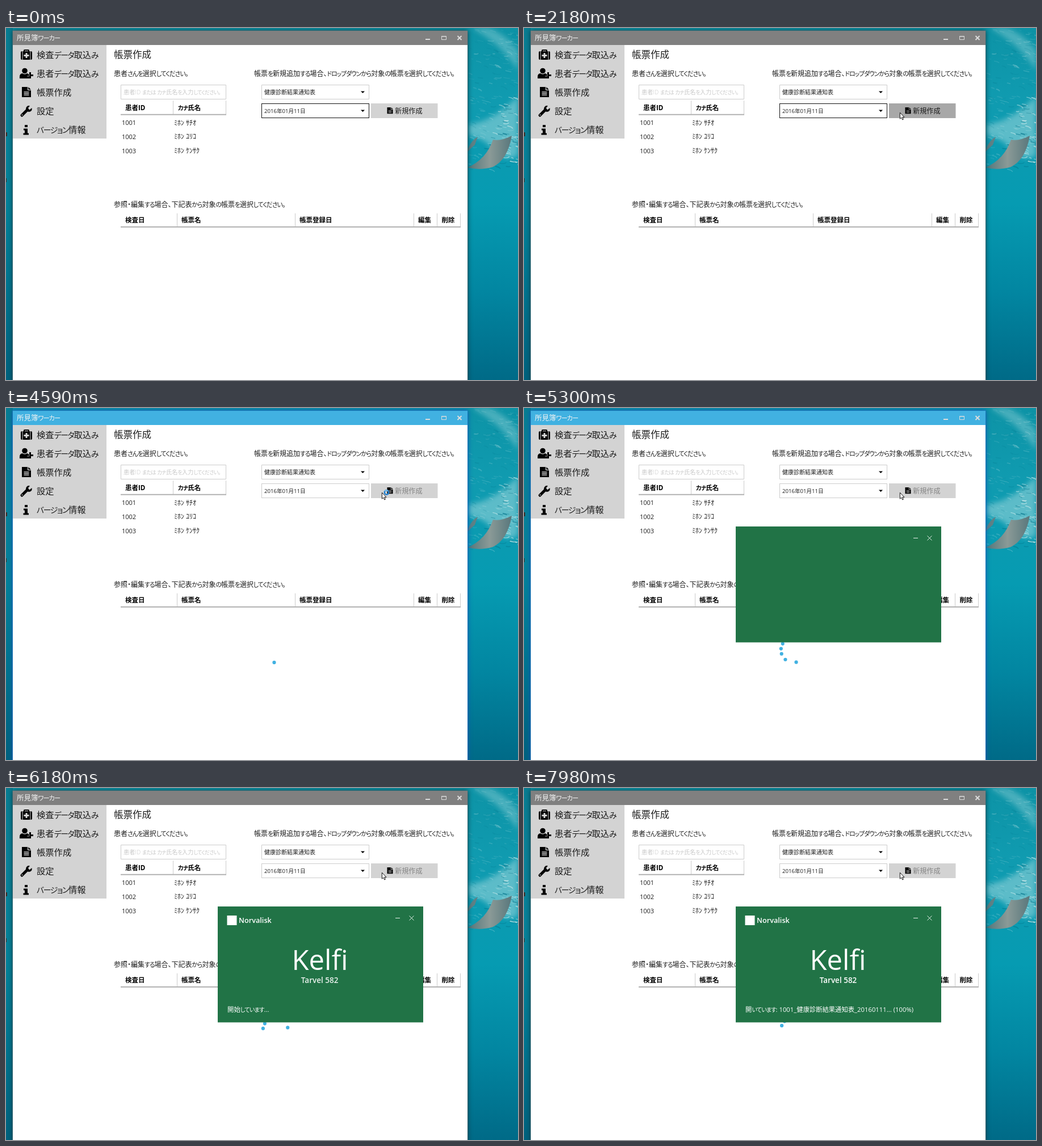
Recreate the animation shown at these times as an HTML page. Size 902 px wide and 621 px high, loop 8 s.

```html
<!DOCTYPE html>
<html lang="ja">
<head>
<meta charset="utf-8">
<style>
html, body { margin: 0; width: 100%; height: 100%; overflow: hidden; }
svg { display: block; width: 902px; height: 621px; }
text { font-family: "Open Sans", "Noto Sans CJK JP", "Noto Sans CJK", sans-serif; font-feature-settings: "palt"; white-space: pre; }
.kana { font-size: .9em; letter-spacing: -.09em; }
#frame { filter: drop-shadow(0 0 4px var(--glow)); }
.soft { filter: blur(5px); }
</style>
</head>
<body>
<svg viewBox="0 0 902 621">
  <defs>
    <linearGradient id="sea" x2="0" y2="1">
      <stop stop-color="#0d93a6"/><stop offset=".2" stop-color="#109bb0"/>
      <stop offset=".5" stop-color="#069bb2"/><stop offset=".75" stop-color="#0286a1"/>
      <stop offset="1" stop-color="#006a87"/>
    </linearGradient>
    <linearGradient id="wing" x2="1">
      <stop stop-color="#50757a"/><stop offset=".5" stop-color="#8b9a97"/><stop offset="1" stop-color="#58777c"/>
    </linearGradient>
    <path id="doc" d="M0 0H10V6H16V18H0ZM11.3 0 16 4.7H11.3ZM3.5 8.3V9.7H12.5V8.3ZM3.5 11V12.4H12.5V11ZM3.5 13.7V15.1H12.5V13.7Z" fill-rule="evenodd"/>
  </defs>

  <rect width="902" height="621" fill="url(#sea)"/>
  <rect width="12" height="621" fill="#00506a" opacity=".35"/>
  <g class="soft" fill="#d5eeee">
    <path d="M814 170Q860 165 902 120V225Q880 240 850 205Q830 190 814 190Z" opacity=".4"/>
    <path d="M820 0Q870 25 902 75V40Q880 10 850 0Z" opacity=".3"/>
  </g>
  <g id="foam" fill="none" stroke-linecap="round"></g>
  <path d="M813 246Q846 232 858 197Q872 200 891 190Q884 232 858 245Q834 252 813 246Z" fill="url(#wing)"/>
  <path d="M813 214Q822 196 831 192L826 206 813 218Z" fill="#5f8085"/>
  <path d="M0 184h2v7h-2zM0 265h1v7h-1z" fill="#3a2c28"/>

  <rect id="frame" x="11.5" y="4.5" width="802" height="622"/>
  <rect x="12" y="30" width="801" height="591" fill="#fff"/>
  <rect id="bar" x="12" y="5" width="801" height="25"/>
  <g fill="none" stroke="#dcdcdc">
    <path d="M739 20H747M795.5 14 802.5 21M802.5 14 795.5 21" stroke-width="2"/>
    <path d="M767.5 14.5H775.5V20.5H767.5ZM767 15H776"/>
  </g>

  <rect x="12" y="30" width="165" height="165" fill="#d3d3d3"/>
  <path d="M31 41V39.5Q31 38 32.500 38H39.500Q41 38 41 39.500V41H44Q46 41 46 43V54Q46 56 44 56H28Q26 56 26 54V43Q26 41 28 41ZM33 40V41H39V40ZM28.600 41V56H29.600V41ZM42.400 41V56H43.400V41ZM34.500 44V47H31.500V50H34.500V53H37.500V50H40.500V47H37.500V44Z" fill-rule="evenodd"/>
  <circle cx="33" cy="75.500" r="4.800"/>
  <path d="M24 89V86Q24 80.500 29 80Q33 83 37 80Q40 80.500 41 83V89ZM41 78h3v4h4v3h-4v4h-3v-4h-4v-3h4z"/>
  <path d="M37 85H41V82" fill="none" stroke="#d3d3d3" stroke-width=".7"/>
  <use href="#doc" x="28" y="104"/>
  <path d="M28 154 38 144" stroke="#000" stroke-width="5" stroke-linecap="round"/>
  <path d="M42 137.500 39 141V144H42L45.500 141Q46.500 146 42.500 147.500Q38 149 35.500 145Q34 140 38 137.500Q40 136.700 42 137.500Z"/>
  <circle cx="28.500" cy="153.500" r="1" fill="#d3d3d3"/>
  <path d="M33 171h5v4h-5zM31 177.500h7v8h2v3H30.500v-3H33v-5h-2z"/>

  <g fill="none" stroke="#ccc">
    <path d="M202.500 100.500H387.500V125.500H202.500ZM450.500 100.500H639.500V125.500H450.500Z"/>
    <rect id="date" x="450.500" y="133.500" width="189" height="25"/>
    <path d="M294.500 128V152M387.500 128V152M301.500 327V350M509.500 327V350M718.500 327V350M759.500 327V350M800.500 327V350"/>
    <path d="M202 152.800H388M202 351H801" stroke="#b2b2b2" stroke-width="2"/>
  </g>
  <path d="M625 111.500h7l-3.500 3.500zM625 144.500h7l-3.500 3.500z"/>
  <rect id="button" x="643" y="133" width="117.500" height="26"/>
  <use href="#doc" transform="translate(671.500 140) scale(.63)"/>
  <g id="labels"></g>
  <g id="ring" fill="#41b1e1"></g>

  <g id="splash">
    <rect x="373" y="209" width="362" height="204.500" fill="#217346"/>
    <path d="M686 229.500H694M710.500 225.500 718.500 233.500M718.500 225.500 710.500 233.500" fill="none" stroke="#fff" stroke-width=".9"/>
    <g id="brand"><rect x="389.500" y="225" width="17" height="17" fill="#fff"/></g>
    <g id="edition"></g>
    <g id="starting"></g>
    <g id="opening"></g>
  </g>

  <g id="cursor">
    <path d="M.4 .3V11.300L2.900 8.900 4.600 12.900 6.400 12.100 4.700 8.300H8Z" fill="#fff" stroke="#000" stroke-width=".9"/>
    <g id="busy" fill="none"><circle cx="8.500" cy="0" r="3.700" stroke="#1f7fd0" stroke-width="2.400"/><path d="M5.500 -2.300A3.700 3.700 0 0 1 10.800 -2.900" stroke="#8fd0f5" stroke-width="1.600"/></g>
  </g>
</svg>
<script>
const $ = id => document.getElementById(id);
const svgNS = "http://www.w3.org/2000/svg";

function add(parent, tag, attrs) {
  const el = document.createElementNS(svgNS, tag);
  for (const k in attrs) el.setAttribute(k, attrs[k]);
  return $(parent).appendChild(el);
}

// Text centred vertically on cy; kana are set smaller and tighter than kanji.
function label(parent, x, cy, size, str, attrs = {}) {
  const el = add(parent, "text", { x, y: cy + size * .38, "font-size": size, fill: "#1c1c1c", ...attrs });
  el.innerHTML = str.replace(/[ぁ-んァ-ヶー]+/g, '<tspan class="kana">$&</tspan>');
  return el;
}

label("labels", 19, 17.5, 12.5, "所見簿ワーカー", { fill: "#f4f4f4" });
["検査データ取込み", "患者データ取込み", "帳票作成", "設定", "バージョン情報"]
  .forEach((s, i) => label("labels", 54, 47.500 + 33 * i, 15.3, s));
label("labels", 190, 46.5, 16.5, "帳票作成");
label("labels", 190, 80, 12, "患者さんを選択してください。");
label("labels", 437, 80, 12, "帳票を新規追加する場合、ドロップダウンから対象の帳票を選択してください。");
label("labels", 190, 311.5, 12, "参照・編集する場合、下記表から対象の帳票を選択してください。");
label("labels", 207, 113.5, 10.2, "患者ID または カナ氏名を入力してください。", { fill: "#c8c8c8", "font-weight": 300 });
label("labels", 455, 113.5, 10, "健康診断結果通知表");
label("labels", 455, 146.5, 9.6, "2016年01月11日");
const create = label("labels", 685, 146.5, 12.2, "新規作成");
[[210, 141, "患者ID"], [303, 141, "カナ氏名"], [210, 339, "検査日"], [309, 339, "帳票名"],
 [517, 339, "帳票登録日"], [726, 339, "編集"], [767.5, 339, "削除"]]
  .forEach(([x, y, s]) => label("labels", x, y, 11.5, s, { "font-weight": 700, fill: "#000" }));
["ﾐﾎﾝ ｻﾁｵ", "ﾐﾎﾝ ﾕﾘｺ", "ﾐﾎﾝ ｹﾝｻｸ"].forEach((s, i) => {
  label("labels", 204, 167 + 24.7 * i, 11, `${1001 + i}`);
  label("labels", 296, 167 + 24.7 * i, 12, s);
});

const white = { fill: "#fff" }, centred = { ...white, "text-anchor": "middle" };
label("brand", 410, 233, 12.7, "Norvalisk", { ...white, "font-weight": 600 });
label("brand", 553, 302.4, 49, "Kelfi", centred);
label("edition", 553.5, 339, 13.5, "Tarvel 582", { ...centred, "font-weight": 600 });
label("starting", 390, 390.5, 11.4, "開始しています...", white);
label("opening", 390, 390.5, 11.3, "開いています: 1001_健康診断結果通知表_20160111... (100%)", white);

// Sea spray on the wallpaper.
let seed = 7;
const rnd = () => (seed = seed * 16807 % 2147483647) / 2147483647;
for (let i = 0; i < 210; i++) {
  const y = i < 130 ? 120 + 130 * rnd() : 110 * rnd();
  const x = 815 + 87 * rnd(), near = i < 130 && x + y * .35 > 915 ? .65 : .22;
  const len = 2 + 7 * rnd();
  add("foam", "path", {
    d: `M${x} ${y}q${len} ${len * .2} ${len * 1.3} ${len * (rnd() - .2)}`,
    stroke: rnd() < .7 ? "#e6f6f4" : "#04748a", "stroke-width": .6 + 1.4 * rnd(), opacity: near * (.4 + rnd() * .6)
  });
}

// Progress ring: six dots follow the same keyed rotation, 167 ms and 6 degrees apart.
const dots = Array.from({ length: 6 }, () => add("ring", "circle", { r: 3.1 }));
const turns = [
  [0, -110], [433, 10, .02, .33, .38, .77], [1200, 93], [1617, 205, .57, .17, .95, .75],
  [2017, 357, 0, .19, .07, .72], [2783, 439], [3217, 585, 0, 0, .95, .37]
];
const ringClock = [[2885, 0], [4360, 1475], [4589, 1475], [4590, 31], [5300, 890], [6180, 1565], [7980, 3400], [8000, 3420]];

const clamp = v => Math.max(0, Math.min(1, v));
const easeOut = p => 1 - (1 - clamp(p)) ** 3;
const bez = (a, b, s) => 3 * (1 - s) ** 2 * s * a + 3 * (1 - s) * s * s * b + s ** 3;

function spline(p, x1, y1, x2, y2) {
  if (x1 === undefined) return p;
  let lo = 0, hi = 1;
  for (let i = 0; i < 20; i++) {
    const mid = (lo + hi) / 2;
    if (bez(x1, x2, mid) < p) lo = mid; else hi = mid;
  }
  return bez(y1, y2, lo);
}

function track(keys, t) {
  const i = keys.findIndex(k => k[0] > t);
  const [t0, v0] = keys[i - 1], [t1, v1, ...curve] = keys[i];
  return v0 + (v1 - v0) * spline((t - t0) / (t1 - t0), ...curve);
}

function drawRing(t) {
  const clock = t < 2885 ? -1 : track(ringClock, t);
  dots.forEach((dot, i) => {
    const own = clock - 167 * i, on = own >= 0 && own < 3217;
    show(dot, on);
    if (!on) return;
    const a = (track(turns, own) - 6 * i + 265) * Math.PI / 180;
    dot.setAttribute("cx", 474.7 + 22 * Math.sin(a));
    dot.setAttribute("cy", 427 - 22 * Math.cos(a));
  });
}

const hops = [[560, 737, 496], [640, 706, 446], [1020, 600, 370], [1100, 510, 300], [1180, 640, 252]];
function pointer(t) {
  if (t < 1480) return (hops.findLast(h => h[0] <= t) || [0, -50, -50]).slice(1);
  const p = Math.min(1, (Math.floor((t - 1480) / 77.7) + 1) / 10), q = 1 - p;
  const along = (a, b, c) => q * q * a + 2 * p * q * b + p * p * c;
  return [along(640, 630, 662), along(252, 175, 149)];
}

const show = (el, on) => el.setAttribute("visibility", on ? "inherit" : "hidden");
const fill = (el, c) => el.setAttribute("fill", c);

function draw(t) {
  const active = t >= 2640 && t < 5380, disabled = t >= 2870;
  fill($("bar"), active ? "#41b1e1" : "#808080");
  fill($("frame"), active ? "#2b78c5" : "#5a6c70");
  $("frame").style.setProperty("--glow", active ? "#0b53b0" : "#0a3c48");

  const [x, y] = pointer(t), hover = !disabled && x >= 643 && y < 159;
  $("cursor").setAttribute("transform", `translate(${x} ${y})`);
  show($("busy"), t >= 3750 && t < 5060);
  fill($("button"), hover ? "#a8a8a8" : "#d3d3d3");
  fill(create, disabled ? "#858585" : "#1c1c1c");
  $("date").setAttribute("stroke", disabled ? "#ccc" : "#111");
  drawRing(t);

  show($("splash"), t >= 5060);
  const enter = easeOut((t - 5470) / 640);
  $("brand").setAttribute("opacity", enter);
  $("brand").setAttribute("transform", `translate(${-9 * (1 - enter)} 0)`);
  const late = easeOut((t - 5700) / 900);
  $("edition").setAttribute("opacity", late);
  $("edition").setAttribute("transform", `translate(${-9 * (1 - late)} 0)`);
  show($("starting"), t >= 5630 && t < 7370);
  show($("opening"), t >= 7370);
}

const start = performance.now();
function tick() {
  draw((performance.now() - start) % 8000);
  requestAnimationFrame(tick);
}
tick();
</script>
</body>
</html>
```
